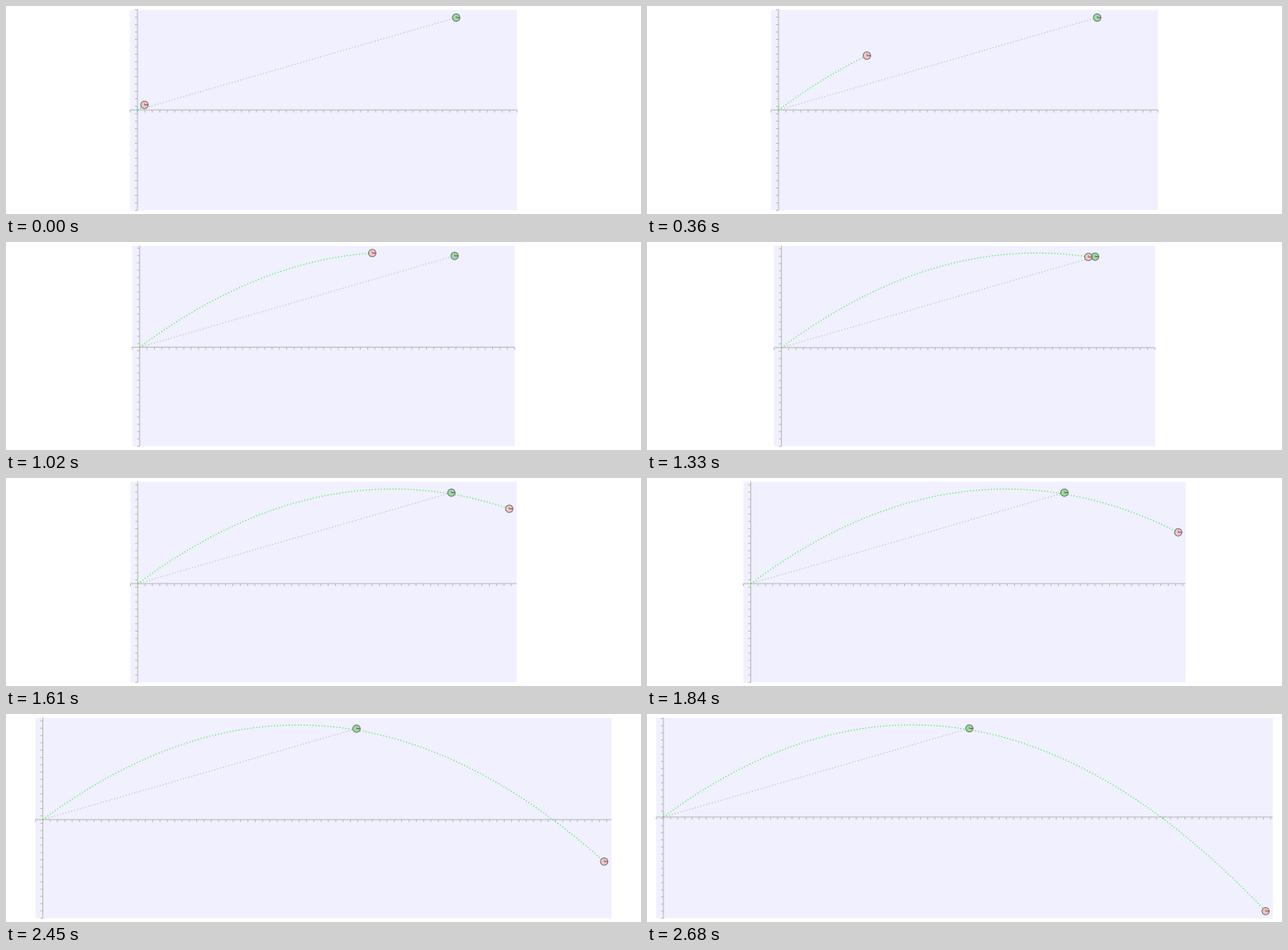
Write a matplotlib script that moves like this. It is 768 px wide and 252 px high and loops after 2730 ms.

```python
import numpy as np
import matplotlib.pyplot as plt
from matplotlib.animation import FuncAnimation
from matplotlib.patches import Circle, Rectangle

W, H, DPI = 768, 252, 100
PX = 72 / DPI                      # one pixel in points
TICK_MS, LOOP_MS = 10, 2730

# Pose durations: mostly 50 ms, with a regular shorter one
SHORT = {2, 7, 12, 17, 22, 28, 33, 38, 43, 48, 53}
STARTS = np.cumsum([0] + [30 if i in SHORT else 50 for i in range(58)])

# Horizontal travel of the ball in world units, per pose
POSE = [0, 12, 15, 22, 35, 36, 40, 47, 48, 58]
DIST = [0.94, 17.35, 22.06, 31.63, 50.73, 52.57, 58.37, 68.0, 69.0, 84.3]

RISE, DROP = 0.743, 0.01067        # y = RISE x - DROP x^2
GOAL = (42.83, 12.44)
TOP, BOTTOM = 4.5, 247.5
HALF, RIGHT, RADIUS = 13.5, 51, 0.5
DOTS = (0, (1, 2.6))


def height(x):
    return RISE * x - DROP * x * x


fig = plt.figure(figsize=(W / DPI, H / DPI), dpi=DPI, facecolor="white")
ax = fig.add_axes([0, 0, 1, 1])
ax.set_xlim(0, W)
ax.set_ylim(H, 0)
ax.axis("off")

panel = ax.add_patch(Rectangle((0, 0), 1, 1, fc="#f0f0ff", ec="none", snap=False))


def line(color, width=1.0, z=2, **kw):
    item, = ax.plot([], [], color=color, lw=width * PX, zorder=z, snap=False,
                    solid_capstyle="butt", dash_capstyle="butt", **kw)
    return item


axes_line = line("#b8b8b8")
ticks = line("#b8b8b8")
origin = line("#90e890", 1.0, 3)
sight = line("#b0b0b0", 1.0, 3, ls=DOTS)
trail = line("#00f000", 1.0, 4, ls=DOTS)


class Disc:
    def __init__(self, fill, z):
        self.body = ax.add_patch(Circle((0, 0), 1, fc=fill, ec="#686868",
                                        lw=0.9 * PX, zorder=z))
        self.up = line("#60a060", 0.8, z + 1)
        self.side = line("#b03030", 1.0, z + 1)

    def place(self, x, y, r):
        self.body.center = (x, y)
        self.body.radius = r
        self.up.set_data([x, x], [y, y - 0.5 * r])
        self.side.set_data([x, x + r], [y, y])


goal = Disc((0.54, 0.88, 0.62, 0.9), 5)
ball = Disc((0.93, 0.77, 0.77, 0.9), 8)


def segments(x0, y0, x1, y1):
    """Join separate strokes into one line with gaps."""
    x0, y0, x1, y1 = np.broadcast_arrays(x0, y0, x1, y1)
    gap = np.full(x0.shape, np.nan)
    return np.stack([x0, x1, gap], 1).ravel(), np.stack([y0, y1, gap], 1).ravel()


def draw(n):
    pose = np.searchsorted(STARTS, n * TICK_MS, side="right") - 1
    x = np.interp(pose, POSE, DIST)
    path = np.linspace(0, x, 200)
    arc = height(path)

    # The view grows to keep the ball one unit inside
    ymax = max(HALF, arc.max() + 1)
    ymin = min(-HALF, arc[-1] - 1)
    xmax = max(RIGHT, x + 1)
    s = (BOTTOM - TOP) / (ymax - ymin)
    left = W / 2 - (xmax + 1) * s / 2
    right = W - left
    ox, oy = left + s, TOP + ymax * s

    def sx(v):
        return ox + s * v

    def sy(v):
        return oy - s * v

    panel.set_bounds(left, TOP, right - left, BOTTOM - TOP)
    axes_line.set_data([left, right, np.nan, ox, ox],
                       [oy, oy, np.nan, TOP, BOTTOM])
    tx = np.arange(left, right + 0.01, s)
    ty = np.arange(BOTTOM, TOP - 0.01, -s)
    ax_x, ax_y = segments(tx, oy, tx, oy + 3)
    ay_x, ay_y = segments(ox - 3, ty, ox, ty)
    ticks.set_data(np.r_[ax_x, ay_x], np.r_[ax_y, ay_y])
    origin.set_data([ox, ox], [oy, oy - RADIUS * s])

    gx, gy = sx(GOAL[0]), sy(GOAL[1])
    sight.set_data([ox, gx], [oy, gy])
    trail.set_data(sx(path), sy(arc))
    goal.place(gx, gy, RADIUS * s)
    ball.place(sx(x), sy(arc[-1]), RADIUS * s)
    return []


anim = FuncAnimation(fig, draw, frames=LOOP_MS // TICK_MS, interval=TICK_MS,
                     repeat=True, repeat_delay=0, init_func=lambda: draw(0))
plt.show()
```
